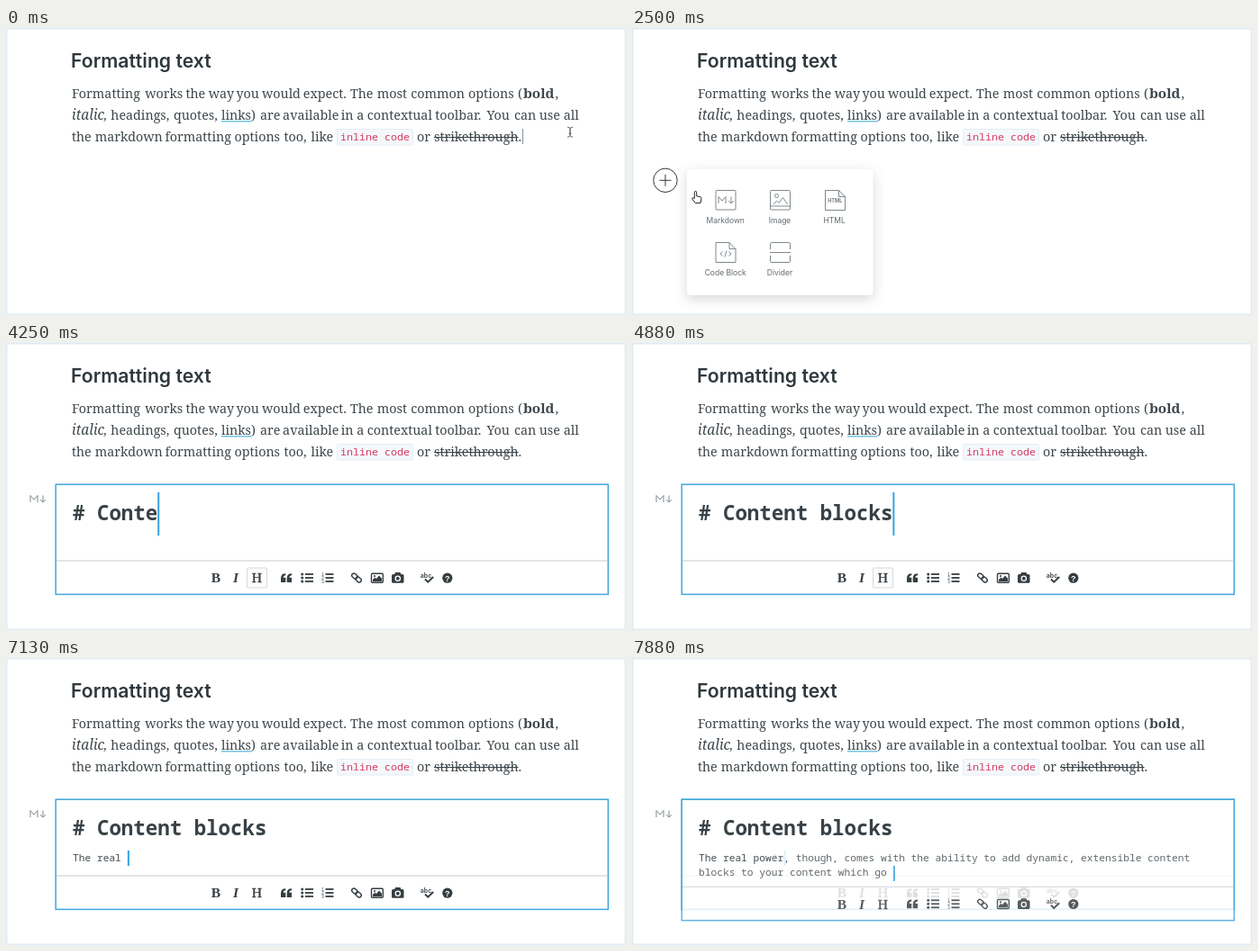
An HTML page for the animation above (8000 ms loop, 688 by 319 pixels).

```html
<!DOCTYPE html>
<html lang="en">
<head>
<meta charset="utf-8">
<title>Formatting text</title>
<style>
html, body { margin: 0; width: 100%; height: 100%; overflow: hidden; background: #fff; }
svg { display: block; width: 100%; height: 100%; }
.title { font: 600 21.2px Inter, sans-serif; fill: #2f383d; }
.body { font: 14.3px "Noto Serif", serif; fill: #3d464b; }
.mono { font: 11.22px "Noto Sans Mono", monospace; fill: #444d52; }
.big { font-size: 22.44px; font-weight: 600; fill: #384146; }
.code { font-size: 11.67px; fill: #d63a61; }
.label { font: 8.5px Inter, sans-serif; fill: #636c71; text-anchor: middle; }
.line { fill: none; stroke: #7f888d; }
.bar { fill: #363e42; font: 15.5px "Liberation Serif", serif; text-anchor: middle; }
.bar .tiny { font: 4.5px "Liberation Sans", sans-serif; }
.bar .out { fill: none; stroke: #363e42; stroke-width: 1.4; }
.caret { fill: #35a3e2; }
.menu { filter: drop-shadow(0 4px 7px rgba(0, 0, 0, .16)); }
.cursor { fill: #fff; stroke: #222; stroke-linejoin: round; }
</style>
</head>
<body>
<svg viewBox="0 0 688 319">
  <rect x=".75" y=".75" width="686.5" height="317.5" fill="#fff" stroke="#deebf5" stroke-width="1.5"/>
  <text class="title" x="72" y="44">Formatting text</text>
  <g class="body" id="para"></g>
  <g id="stage"></g>
</svg>
<script>
const STEP = 125, LOOP = 8000;
const CHAR = 6.73, LEFT = 74;
const HEADING = '# Content blocks';
const HEAD_LENGTHS = [1, 2, 3, 4, 5, 7, 9, 11, 13, 14, 16];
const TYPO = ['T', 'Ti', 'Tie', 'Ti', 'T', 'T'];
const SENTENCE = 'The real pow3er';
const SENTENCE_LENGTHS = [2, 4, 6, 9, 12, 15, 14];

const $ = id => document.getElementById(id);
const text = (x, y, str, attrs = '') => `<text x="${x}" y="${y}" ${attrs}>${str}</text>`;
const rect = (x, y, w, h, attrs = '') => `<rect x="${x}" y="${y}" width="${w}" height="${h}" ${attrs}/>`;
const path = (d, attrs = '') => `<path d="${d}" ${attrs}/>`;
const caret = (x, y, h) => rect(x, y, 2, h, 'class="caret"');
const words = (y, str, xs) => str.split(' ').map((w, i) => text(xs[i], y, w)).join('');

$('para').innerHTML =
  words(77.7, 'Formatting works the way you would expect. The most common options (',
    [73, 154.2, 199.4, 224.8, 255.4, 284, 329.8, 382, 411.7, 449.3, 513.1, 568.1]) +
  text(574, 77.7, 'bold', 'font-weight="700" font-size="15.2"') + text(609.5, 77.7, ',') +
  text(73, 102, 'italic', 'font-style="italic" font-size="15.4"') +
  words(102, ', headings, quotes, links ) are available in a contextual toolbar. You can use all',
    [108, 116.3, 186, 239, 272, 282, 307.1, 371.7, 389.2, 400.8, 476.2, 533.6, 564, 591.7, 618.7]) +
  rect(239, 103.2, 33, 1.2, 'fill="#55b5e2"') +
  words(126.3, 'the markdown formatting options too, like or strikethrough .',
    [73, 98.8, 176.5, 253.5, 308.5, 338.5, 456, 475, 568.5]) +
  rect(475, 121, 93.5, 1.1) +
  rect(367.5, 112.5, 84, 17.5, 'rx="1" fill="#f4f8fb" stroke="#e3edf4"') +
  text(371, 125.2, 'inline code', 'class="mono code"');

const mdMark = (x, y) => path(`M${x} ${y}v-7.5l4 4.5 4-4.5v7.5m6-7.5v7.5m-2.8-2.8l2.8 2.8 2.8-2.8`, 'class="line"');
const page = (x, y) => path(`M${x} ${y}h15l7 7v15h-22zM${x + 15} ${y}v7h7`, 'class="line"');

const MENU =
  rect(61, 157, 206.5, 140, 'rx="3" fill="#fff" class="menu"') + '%HOVER%' +
  rect(93, 180.5, 22, 21.5, 'rx="1" class="line"') + mdMark(96, 195) +
  rect(153.5, 180.5, 22, 21.5, 'rx="1" class="line"') +
  path('M154 198h21M157 196l3.5-4 2.5 2.5 4.5-6 5 7.5', 'class="line"') +
  '<circle cx="160.5" cy="186.5" r="2" class="line"/>' +
  page(214.5, 180.5) + text(225.3, 194.2, 'HTML', 'class="label" style="font-size:5.6px;font-weight:600"') +
  page(93, 238.5) +
  path('M100.5 248.5l-2.7 2.5 2.7 2.5m7-5l2.7 2.5-2.7 2.5m-2.5-6l-2 7', 'class="line"') +
  path('M153.5 246v-6.5q0-1 1-1h20q1 0 1 1v6.5M153 249.5h23M153.5 253v6.5q0 1 1 1h20q1 0 1-1v-6.5', 'class="line"') +
  [['Markdown', 103.7, 216.7], ['Image', 164, 216.7], ['HTML', 224.7, 216.7], ['Code Block', 103.7, 274.5], ['Divider', 164, 274.5]]
    .map(([s, x, y]) => text(x, y, s, 'class="label"')).join('');

const quote = x => path(`M${x} 266v-4.5q0-5.2 5.3-5.3v2q-2.6 0-2.6 2.6h2.6v5.2z`);
const rows = (x, mark) => [257, 261, 265].map((y, i) => rect(x, y - .9, 9, 1.8) + mark(y, i)).join('');

const TOOLBAR = '<g class="bar">' +
  text(233, 266.3, 'B', 'font-weight="700"') +
  text(255, 266.3, 'I', 'font-weight="700" font-style="italic"') +
  text(278.3, 266.3, 'H', 'stroke="#363e42" stroke-width=".4"') +
  quote(305) + quote(311.7) +
  rows(332, y => `<circle cx="328.7" cy="${y}" r="1.5"/>`) +
  rows(354.5, (y, i) => text(351.5, y + 1.7, i + 1, 'class="tiny"')) +
  '<g transform="rotate(42 389 261)">' +
  rect(382.7, 258.7, 6.8, 4.6, 'rx="2.3" class="out"') + rect(388.5, 258.7, 6.8, 4.6, 'rx="2.3" class="out"') + '</g>' +
  rect(405.5, 256.2, 12.8, 10, 'rx="1" class="out"') +
  path('M407 265v-2l2.5-2.5 1.5 1.5 3-3.5 3 3.2v3.3z') + '<circle cx="409" cy="259" r="1.1"/>' +
  rect(428, 257, 13.5, 9.7, 'rx="1.5"') + path('M431 257.5l1-2.5h5.5l1 2.5z') +
  '<circle cx="434.8" cy="261.7" r="2.6" fill="none" stroke="#fff" stroke-width="1.3"/>' +
  text(466, 260.7, 'abc', 'style="font:600 7px Inter,sans-serif"') +
  path('M465 262.5l3.2 3.2 6-5.7', 'class="out" style="stroke-width:2"') +
  '<circle cx="489.8" cy="261.2" r="5.6"/>' +
  text(489.8, 264.6, '?', 'style="font:700 9px Liberation Sans,sans-serif;fill:#fff"') + '</g>';

// Markdown card; grow is the extra height in pixels
const card = (grow, content, headingOn) =>
  rect(55.2, 157.2, 613, 122.2 + grow, 'fill="#fff" stroke="#43a6db" stroke-width="1.5"') +
  rect(56, 241.5 + grow, 611.5, 1, 'fill="#c8cdd0"') +
  (headingOn ? rect(267.5, 250, 22, 22, 'rx="1" fill="#fcfcfc" stroke="#d6d8d9"') : '') +
  `<g transform="translate(0 ${grow})">${TOOLBAR}</g>` + content;

const heading = len => text(LEFT, 197.3, HEADING.slice(0, len), 'class="mono big"');
const small = (y, str) => text(LEFT, y, str, 'class="mono"');
const ibeam = (x, y) => path('M-3-5.5q3 0 3 2v7q0 2-3 2M3-5.5q-3 0-3 2v7q0 2 3 2M-1.5 1.5h3',
  `transform="translate(${x} ${y})" fill="none" stroke="#6a6a6a"`);
const hand = (x, y) => path('M-1.2 1.2q0-1.4 1.2-1.4t1.2 1.4v4l4.3 1q1.2.4 1 1.8l-1 5h-5.6l-3.9-5q.4-1.7 2.8-.2z',
  `transform="translate(${x} ${y})" class="cursor"`);

function opening(n) {
  let s = n < 1 ? rect(573, 112, 1, 17, 'fill="#7d93a1"') : '';
  if (n < 3) return s + ibeam(626, n < 1 ? 115.7 : 118);
  const tone = n < 6 ? '#a3adb2' : '#30383c';
  s += `<g fill="none" stroke="${tone}"><circle cx="37" cy="169.3" r="13.2"/>` + path('M30.5 169.3h13M37 162.8v13') + '</g>';
  if (n > 6) {
    const p = Math.min(1, (n - 6) / 4), ease = 1 - (1 - p) ** 2;
    const hover = n > 20 ? rect(74, 166, 60, 60, 'rx="3" fill="#f3f7fa"') : '';
    s += `<g opacity="${ease}">${MENU.replace('%HOVER%', hover)}</g>`;
  }
  if (n < 4) return s + ibeam(330, 147);
  const p = Math.max(0, Math.min(1, (n - 18) / 4)), ease = p * p * (3 - 2 * p);
  return s + hand(37 + 67 * ease, 169.2 + 24.8 * ease);
}

function typing(n) {
  if (n < 29) return (n < 27 ? caret(74.5, 165, 17) : '') + (n < 26 ? ibeam(105, 195) : '');
  if (n < 42) {
    const len = HEAD_LENGTHS[Math.min(n - 29, 10)];
    return heading(len) + caret(LEFT + len * CHAR * 2, 166, 48);
  }
  const str = n < 48 ? '' : n < 54 ? TYPO[n - 48] : SENTENCE.slice(0, SENTENCE_LENGTHS[Math.min(n - 54, 6)]);
  const blink = n === 44 || n === 45;
  return heading(16) + small(225.6, str) + (blink ? '' : caret(LEFT + .3 + str.length * CHAR, 214, 17));
}

function finished(n) {
  const last = 'blocks to your content which' + ['', ' ', ' go '][n - 61];
  return heading(16) +
    small(225.6, 'The real power, though, comes with the ability to add dynamic, extensible content') +
    small(242.4, last) + caret(LEFT + .5 + last.length * CHAR, 231, 17);
}

function scene(n) {
  if (n < 25) return opening(n);
  let s = mdMark(27, 177) + card(0, typing(n), n >= 29 && n < 42);
  if (n > 60) s += `<g opacity="${[.1, .45, .84][n - 61]}">${card(12.3, finished(n))}</g>`;
  return s;
}

let shown = -1;
function draw() {
  const n = Math.floor(performance.now() % LOOP / STEP);
  if (n !== shown) $('stage').innerHTML = scene(shown = n);
  requestAnimationFrame(draw);
}
draw();
</script>
</body>
</html>
```
